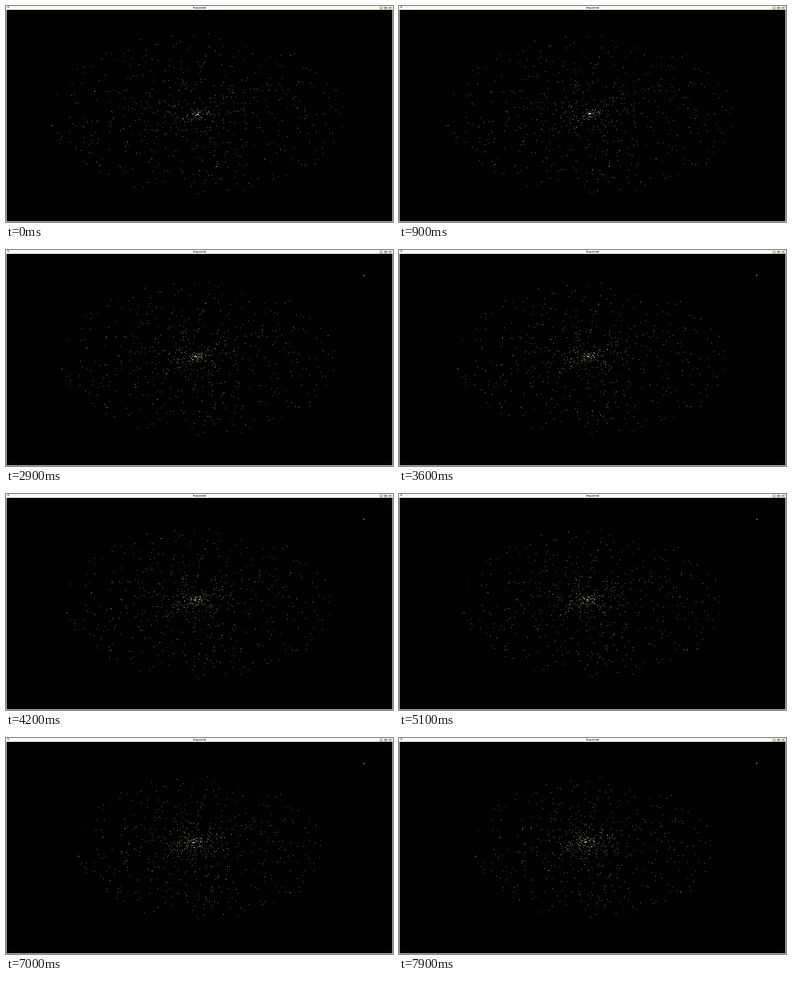
An HTML page with a canvas that plays this animation: 600x337 px, repeating every 8 s.

```html
<!DOCTYPE html>
<html lang="en">
<head>
<meta charset="utf-8">
<title>Particle collapse</title>
<style>
  html, body { margin: 0; width: 100%; height: 100%; overflow: hidden; background: #000; }
  canvas, svg { position: absolute; left: 0; top: 0; width: 600px; height: 337px; }
  text { font: bold 4px "Liberation Sans", Arial, sans-serif; fill: #222; }
</style>
</head>
<body>
<canvas id="sky" width="600" height="337"></canvas>
<svg viewBox="0 0 600 337" shape-rendering="crispEdges">
  <defs>
    <g id="button">
      <rect width="5" height="4" fill="#dcdccc" stroke="#99998a" stroke-width=".5"/>
    </g>
  </defs>
  <rect width="600" height="6" fill="#fbfbf4"/>
  <path d="M.5 6v330.5h599V6" fill="none" stroke="#e4e4d2"/>
  <rect x="2" y="1" width="3" height="3" fill="#555"/>
  <rect x="2" y="2" width="3" height="2" fill="#ddd"/>
  <text x="300" y="4.4" text-anchor="middle">Sequential</text>
  <use href="#button" x="579" y="1"/>
  <use href="#button" x="586" y="1"/>
  <use href="#button" x="593" y="1"/>
  <path d="M580.5 4h2M587.5 2.2h2v1.6h-2zM594.5 2l2 2m0-2l-2 2"
    stroke="#333" stroke-width=".6" fill="none" shape-rendering="auto"/>
  <path id="pointer" d="M554 38v2.6l.8-.5.5 1 .4-.3-.4-.9h.6z" fill="#b4b4a0" shape-rendering="auto"/>
</svg>
<script>
const LOOP = 8000, STEP = 100, COUNT = 660;
const CENTRE = { x: 297, y: 169 }, DRIFT = { x: -8, y: -7 };
const RADIUS = { x: 230, y: 127 };
const SHADES = ["#66668c", "#77777c", "#84823c", "#6c6c48", "#9c9a60", "#a8a8b4"];

const ctx = document.getElementById("sky").getContext("2d");
const pointer = document.getElementById("pointer");

let seed = 7341;
function random() {
  seed = (seed * 1664525 + 1013904223) >>> 0;
  return seed / 4294967296;
}
const spread = amount => (random() - 0.5) * amount;

// Every star falls inward; those near the middle scatter through the core.
function makeStar() {
  const r = random(), angle = random() * 2 * Math.PI;
  const core = Math.max(0, 1 - r / 0.45);
  const heading = angle + Math.PI + spread(4 * core);
  const speed = (1 + spread(r < 0.8 ? 0.7 : 0.2)) * Math.min(1, 0.25 + r / 0.35);
  const cos = Math.cos(heading), sin = Math.sin(heading);
  return {
    x: CENTRE.x + r * RADIUS.x * Math.cos(angle),
    y: CENTRE.y + r * RADIUS.y * Math.sin(angle),
    dx: cos * speed * (cos > 0 ? 48 : 38),
    dy: sin * speed * (sin > 0 ? 20 : 14) * (1 + core * 0.5),
    core,
    drift: Math.max(0, 1 - r * 1.4),
    shade: SHADES[Math.floor(random() * SHADES.length)]
  };
}
const stars = Array.from({ length: COUNT }, makeStar);

function draw(time) {
  const t = Math.floor(time / STEP) * STEP / LOOP;
  const steady = t * (0.85 + 0.15 * t), early = Math.sqrt(t);
  ctx.globalCompositeOperation = "source-over";
  ctx.fillStyle = "#000";
  ctx.fillRect(0, 0, 600, 337);
  ctx.globalCompositeOperation = "lighter";
  for (const s of stars) {
    const fall = steady + (early - steady) * s.core;
    ctx.fillStyle = s.shade;
    ctx.fillRect(
      Math.round(s.x + s.dx * fall + s.drift * DRIFT.x * t),
      Math.round(s.y + s.dy * fall + s.drift * DRIFT.y * t), 1, 1);
  }
  const cx = Math.round(CENTRE.x + DRIFT.x * t), cy = Math.round(CENTRE.y + DRIFT.y * t);
  ctx.fillStyle = "#d8d8bc";
  ctx.fillRect(cx - 2, cy, 4, 1);
  ctx.fillRect(cx, cy - 1, 1, 1);
  pointer.style.display = time < 1000 ? "none" : "";
}

const begin = performance.now();
function tick() {
  draw((performance.now() - begin) % LOOP);
  requestAnimationFrame(tick);
}
tick();
</script>
</body>
</html>
```
